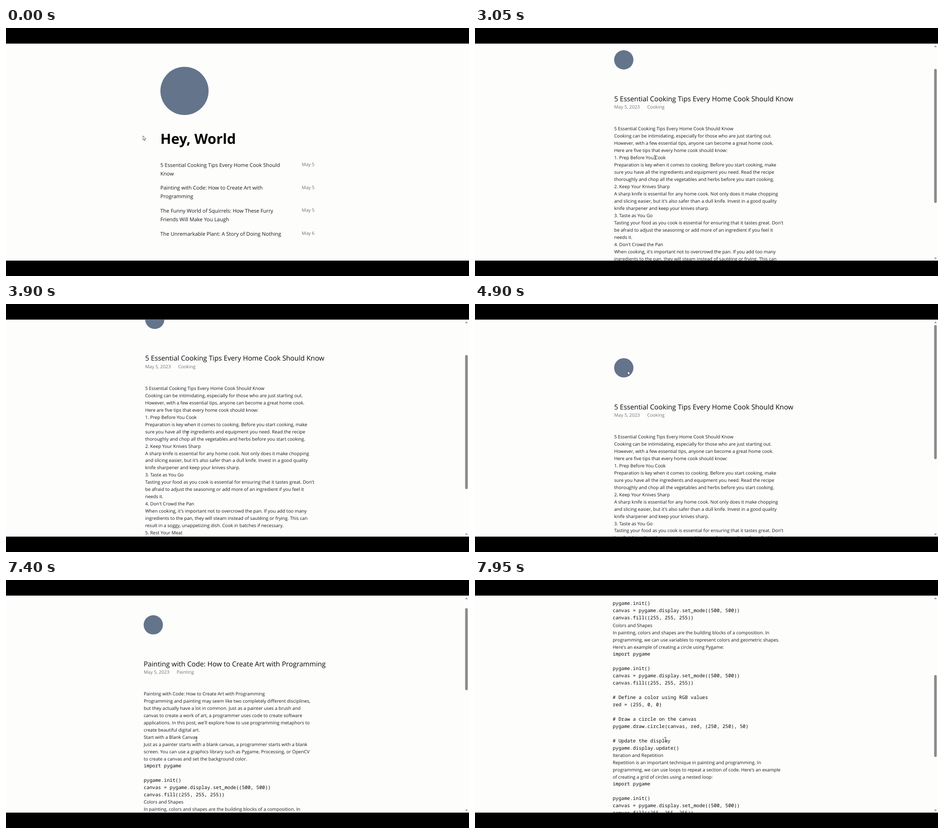
These frames come from a looping animation (1022x548 px, 8000 ms). An HTML page:

```html
<!DOCTYPE html>
<html lang="en">
<head>
<meta charset="utf-8">
<title>Blog walkthrough</title>
<style>
html, body { margin: 0; width: 100%; height: 100%; overflow: hidden; background: #000; }
svg { display: block; width: 1022px; height: 548px; }
text { font-family: "Open Sans", "Noto Sans", sans-serif; font-size: 10.15px; fill: #18181b; white-space: pre; text-rendering: geometricPrecision; }
.head { font-size: 31px; font-weight: 700; fill: #000; }
.link { font-size: 11.42px; }
.title { font-size: 15.22px; fill: #09090b; }
.meta { fill: #71717a; }
.code { font-family: "Noto Sans Mono", "DejaVu Sans Mono", monospace; font-size: 10.64px; fill: #09090b; }
.avatar { fill: #64748b; }
.bar { fill: #8b8b8b; }
</style>
</head>
<body>
<svg viewBox="0 0 1022 548">
  <defs><clipPath id="view"><rect y="34.5" width="1022" height="479.5"/></clipPath></defs>
  <rect width="1022" height="548"/>
  <rect y="34.5" width="1022" height="479.5" fill="#fdfdfc"/>
  <g clip-path="url(#view)">
    <g id="home"></g>
    <g id="cooking"></g>
    <g id="painting"></g>
    <g id="scrollbar" class="bar">
      <path d="M1013.4 42.2L1016.4 38.8L1019.4 42.2Z"/>
      <path d="M1013.4 507.4L1016.4 510.8L1019.4 507.4Z"/>
      <rect id="thumb" x="1013.5" width="5.8" rx="2.9"/>
    </g>
    <path id="arrow" d="M0 0V9.4L2.1 7.4L3.6 10.8L5 10.2L3.5 6.9H6.4Z" fill="#fff" stroke="#222" stroke-width=".7"/>
    <path id="beam" d="M-2.2 -4.3H-.6L0 -3.7L.6 -4.3H2.2M0 -3.7V3.7M-2.2 4.3H-.6L0 3.7L.6 4.3H2.2" fill="none" stroke="#222" stroke-width=".8"/>
  </g>
</svg>
<script>
const LOOP = 8000;
const LINE = 15.96;
const VIEW = 479.5;
const TRACK = { top: 46.5, length: 458.5 };

const $ = id => document.getElementById(id);

function add(parent, tag, attrs, text = '') {
  const el = document.createElementNS('http://www.w3.org/2000/svg', tag);
  for (const key in attrs) el.setAttribute(key, attrs[key]);
  el.textContent = text;
  parent.appendChild(el);
}

const write = (parent, x, y, cls, text) => add(parent, 'text', { x, y, class: cls }, text);

function buildHome(page) {
  const posts = [
    ['May 5', '5 Essential Cooking Tips Every Home Cook Should', 'Know'],
    ['May 5', 'Painting with Code: How to Create Art with', 'Programming'],
    ['May 5', 'The Funny World of Squirrels: How These Furry', 'Friends Will Make You Laugh'],
    ['May 6', 'The Unremarkable Plant: A Story of Doing Nothing']
  ];
  add(page, 'circle', { cx: 394, cy: 139, r: 53.2, class: 'avatar' });
  write(page, 340.8, 256.4, 'head', 'Hey, World');
  posts.forEach(([date, ...lines], i) => {
    const y = 306.9 + i * 50.54;
    lines.forEach((line, j) => write(page, 340.8, y + j * 18.62, 'link', line));
    write(page, 652.8, y - 1.6, 'meta', date);
  });
}

// Lines that begin with "|" are set as code.
function buildArticle(page, x, topic, body) {
  const lines = body.trim().split('\n');
  add(page, 'circle', { cx: x + 21.2, cy: 141, r: 21.3, class: 'avatar' });
  write(page, x, 232.6, 'title', lines[0]);
  write(page, x, 249, 'meta', 'May 5, 2023');
  write(page, x + 72.8, 249, 'meta', topic);
  lines.forEach((line, i) => {
    const code = line[0] === '|';
    write(page, x, 297 + i * LINE - (code ? .5 : 0), code ? 'code' : 'body', code ? line.slice(1) : line);
  });
}

buildHome($('home'));

buildArticle($('cooking'), 307.2, 'Cooking', `
5 Essential Cooking Tips Every Home Cook Should Know
Cooking can be intimidating, especially for those who are just starting out.
However, with a few essential tips, anyone can become a great home cook.
Here are five tips that every home cook should know:
1. Prep Before You Cook
Preparation is key when it comes to cooking. Before you start cooking, make
sure you have all the ingredients and equipment you need. Read the recipe
thoroughly and chop all the vegetables and herbs before you start cooking.
2. Keep Your Knives Sharp
A sharp knife is essential for any home cook. Not only does it make chopping
and slicing easier, but it's also safer than a dull knife. Invest in a good quality
knife sharpener and keep your knives sharp.
3. Taste as You Go
Tasting your food as you cook is essential for ensuring that it tastes great. Don't
be afraid to adjust the seasoning or add more of an ingredient if you feel it
needs it.
4. Don't Crowd the Pan
When cooking, it's important not to overcrowd the pan. If you add too many
ingredients to the pan, they will steam instead of sautéing or frying. This can
result in a soggy, unappetizing dish. Cook in batches if necessary.
5. Rest Your Meat
After cooking meat, it's important to let it rest before slicing into it. This
allows the juices to redistribute throughout the meat, which makes it more
tender and flavorful.
By following these five essential cooking tips, you'll be well on your way to
becoming a great home cook. Remember to have fun in the kitchen and
enjoy the process!
`);

buildArticle($('painting'), 303.9, 'Painting', `
Painting with Code: How to Create Art with Programming
Programming and painting may seem like two completely different disciplines,
but they actually have a lot in common. Just as a painter uses a brush and
canvas to create a work of art, a programmer uses code to create software
applications. In this post, we'll explore how to use programming metaphors to
create beautiful digital art.
Start with a Blank Canvas
Just as a painter starts with a blank canvas, a programmer starts with a blank
screen. You can use a graphics library such as Pygame, Processing, or OpenCV
to create a canvas and set the background color.
|import pygame
|
|pygame.init()
|canvas = pygame.display.set_mode((500, 500))
|canvas.fill((255, 255, 255))
Colors and Shapes
In painting, colors and shapes are the building blocks of a composition. In
programming, we can use variables to represent colors and geometric shapes.
Here's an example of creating a circle using Pygame:
|import pygame
|
|pygame.init()
|canvas = pygame.display.set_mode((500, 500))
|canvas.fill((255, 255, 255))
|
|# Define a color using RGB values
|red = (255, 0, 0)
|
|# Draw a circle on the canvas
|pygame.draw.circle(canvas, red, (250, 250), 50)
|
|# Update the display
|pygame.display.update()
Iteration and Repetition
Repetition is an important technique in painting and programming. In
programming, we can use loops to repeat a section of code. Here's an example
of creating a grid of circles using a nested loop:
|import pygame
|
|pygame.init()
|canvas = pygame.display.set_mode((500, 500))
|canvas.fill((255, 255, 255))
|
|# Draw a grid of circles
`);

// Page shown from each time on; height is the full page length.
const visits = [
  { at: 0, id: 'home' },
  { at: 1950, id: 'cooking', height: 742 },
  { at: 5550, id: 'home' },
  { at: 6650, id: 'painting', height: 1214 }
];

const scrollKeys = [
  [2550, 0], [2700, 10], [2850, 31], [3050, 70.3], [3250, 140], [3400, 188], [3500, 200],
  [3600, 194], [3750, 158], [3900, 107.5], [4050, 48], [4150, 16], [4250, 0], [5550, 0],
  [7200, 0], [7300, 12], [7400, 41.4], [7500, 95], [7650, 201], [7850, 361], [7950, 432], [8000, 462]
];

const moves = [
  { from: 950, to: 1750, x: 376, y: 309 },
  { from: 1950, to: 2300, x: 397, y: 286 },
  { from: 3100, to: 3500, x: 400, y: 286 },
  { from: 4300, to: 4850, x: 337, y: 147.5 },
  { from: 5650, to: 6350, x: 420, y: 352 }
];

const clamp = v => Math.max(0, Math.min(1, v));
const smooth = u => u * u * (3 - 2 * u);
const mix = (a, b, u) => a + (b - a) * u;

function scrollAt(t) {
  const i = scrollKeys.findIndex(key => key[0] > t);
  if (i < 1) return 0;
  const [t0, a] = scrollKeys[i - 1], [t1, b] = scrollKeys[i];
  return mix(a, b, (t - t0) / (t1 - t0));
}

function pointerAt(t) {
  let x = 302.4, y = 238.3;
  for (const m of moves) {
    const u = smooth(clamp((t - m.from) / (m.to - m.from)));
    x = mix(x, m.x, u);
    y = mix(y, m.y, u);
  }
  return { x, y };
}

const show = (id, on) => $(id).setAttribute('visibility', on ? 'visible' : 'hidden');
const move = (id, x, y) => $(id).setAttribute('transform', `translate(${x} ${y})`);

function draw(t) {
  const { id, height } = visits.filter(v => v.at <= t).pop();
  const scroll = scrollAt(t);
  for (const page of ['home', 'cooking', 'painting']) show(page, page === id);
  move(id, 0, -scroll);

  show('scrollbar', !!height);
  if (height) {
    $('thumb').setAttribute('y', TRACK.top + scroll / height * TRACK.length);
    $('thumb').setAttribute('height', VIEW / height * TRACK.length);
  }

  const { x, y } = pointerAt(t);
  const onText = id !== 'home' && y > 215;
  show('arrow', !onText);
  show('beam', onText);
  move(onText ? 'beam' : 'arrow', x, y);
}

const start = performance.now();
function tick() {
  draw((performance.now() - start) % LOOP);
  requestAnimationFrame(tick);
}
tick();
</script>
</body>
</html>
```
